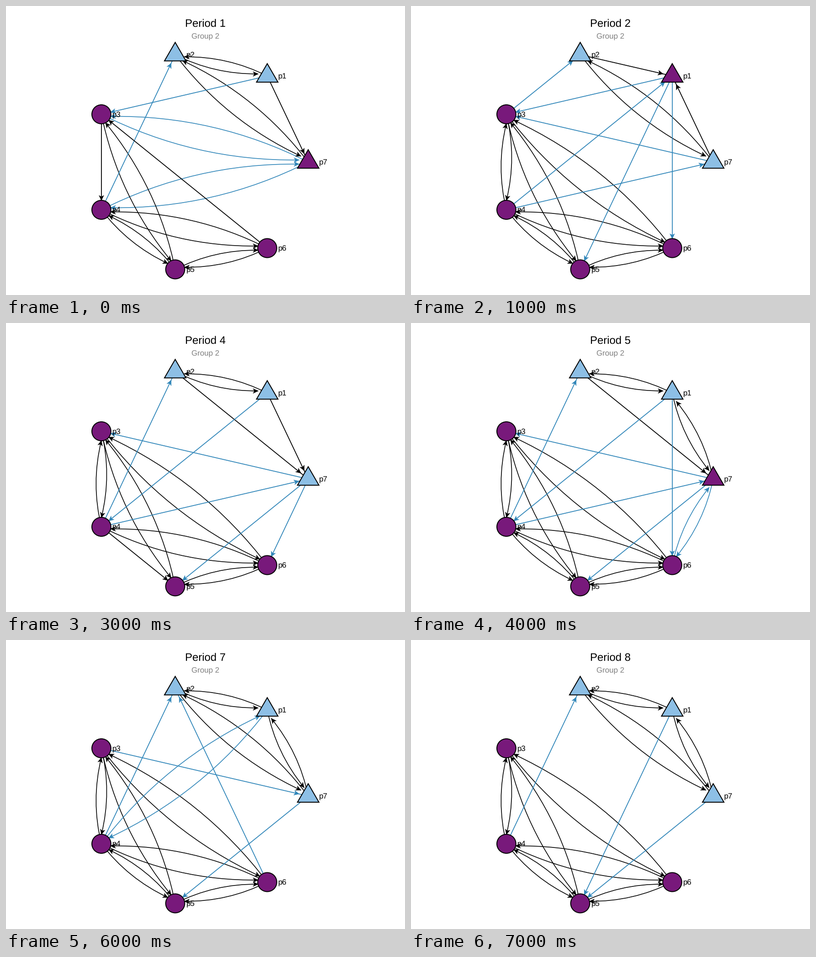
Animation of 878x638 px, one loop 8 s. Source, as a matplotlib script:

```python
import math
import numpy as np
import matplotlib.pyplot as plt
from matplotlib.animation import FuncAnimation
from matplotlib.patches import Circle, PathPatch, Polygon
from matplotlib.path import Path

W, H, DPI = 878, 638, 64
PX = 72 / DPI  # points per pixel

PURPLE, SKY, BLUE, BLACK = "#78197b", "#8dbfe5", "#3086b9", "#000000"
CENTER = np.array([425.6, 344.5])
RADII = np.array([239.4, 243.0])
NODE_R, TRI_R = 21, 27.3
BEND = 0.246  # control point offset for two-way ties
TRIANGLES = {1, 2, 7}

plt.rcParams["font.family"] = "Liberation Sans"
plt.rcParams["text.hinting"] = "none"


def node_pos(n):
    a = 2 * math.pi * n / 7
    return CENTER + RADII * np.array([math.cos(a), -math.sin(a)])


POS = {n: node_pos(n) for n in range(1, 8)}

# Ties per period: "ab" is a one-way tie a -> b, "a=b" goes both ways.
CORE = "3=4 3=5 3=6 4=5 4=6 5=6 "
PERIODS = [
    "1=2 2=7 3=7 4=7 3=5 4=5 4=6 5=6 13 17 34 42 63",
    CORE + "21 2=7 71 32 13 73 41 47 15 16",
    "3=4 53 3=6 4=5 4=6 5=6 1=2 27 17 32 31 15 3=7 47 75 76",
    "3=4 3=5 3=6 45 4=6 5=6 1=2 27 17 42 14 73 47 75 76",
    CORE + "1=2 27 1=7 42 14 16 73 47 75 6=7",
    CORE + "1=2 27 1=7 42 41 16 73 47 75",
    CORE + "1=2 2=7 1=7 42 62 1=4 37 75",
    CORE + "1=2 2=7 1=7 42 15 75",
]
PURPLE_TRIANGLE = [7, 1, 7, None, 7, 7, None, None]

fig = plt.figure(figsize=(W / DPI, H / DPI), dpi=DPI, facecolor="white")
ax = fig.add_axes([0, 0, 1, 1])


def arrow_head(tip, direction, color):
    d = direction / np.hypot(*direction)
    n = np.array([-d[1], d[0]])
    pts = [tip, tip - 11.5 * d + 5.4 * n, tip - 8.5 * d, tip - 11.5 * d - 5.4 * n]
    ax.add_patch(Polygon(pts, fc=color, ec=color, lw=0.4 * PX, zorder=2))


def tie(a, b, mutual):
    start, goal = POS[a], POS[b]
    u = (goal - start) / np.hypot(*(goal - start))
    tip = goal - (NODE_R - 0.7) * u
    color = BLACK if (a in TRIANGLES) == (b in TRIANGLES) else BLUE
    if mutual:
        chord = tip - start
        side = 1 if u[0] * u[1] > 1e-6 else -1
        normal = np.array([-chord[1], chord[0]])
        ctrl = (start + tip) / 2 + side * BEND / 2 * normal
        path = Path([start, ctrl, tip], [Path.MOVETO, Path.CURVE3, Path.CURVE3])
        heading, width = tip - ctrl, 1.65
    else:
        path = Path([start, goal])
        heading, width = u, 1.8
    ax.add_patch(PathPatch(path, fc="none", ec=color, lw=width * PX,
                           capstyle="butt", zorder=1))
    arrow_head(tip, heading, color)


def node(n, purple_triangle):
    x, y = POS[n]
    if n in TRIANGLES:
        fill = PURPLE if n == purple_triangle else SKY
        half = TRI_R * math.sqrt(3) / 2
        base = y + TRI_R / 2
        shape = Polygon([(x, y - TRI_R), (x + half, base), (x - half, base)],
                        joinstyle="miter")
    else:
        fill = PURPLE
        shape = Circle((x, y), NODE_R)
    shape.set(fc=fill, ec=BLACK, lw=2 * PX, zorder=3)
    ax.add_patch(shape)
    label(x + 24.3, y + 6, f"p{n}", 17, ha="left")


def label(x, y, text, size, color=BLACK, ha="center"):
    ax.text(x, y, text, fontsize=size * PX, color=color, ha=ha,
            va="baseline", zorder=4)


def draw(i):
    ax.clear()
    ax.set_xlim(0, W)
    ax.set_ylim(H, 0)
    ax.axis("off")
    for item in PERIODS[i].split():
        a, b = int(item[0]), int(item[-1])
        mutual = "=" in item
        tie(a, b, mutual)
        if mutual:
            tie(b, a, mutual)
    for n in POS:
        node(n, PURPLE_TRIANGLE[i])
    label(438.7, 45.7, f"Period {i + 1}", 24)
    label(438.7, 72.7, "Group 2", 17, "#808080")
    return []


anim = FuncAnimation(fig, draw, frames=len(PERIODS), init_func=lambda: [],
                     interval=1000, repeat=True, repeat_delay=0)
plt.show()
```
